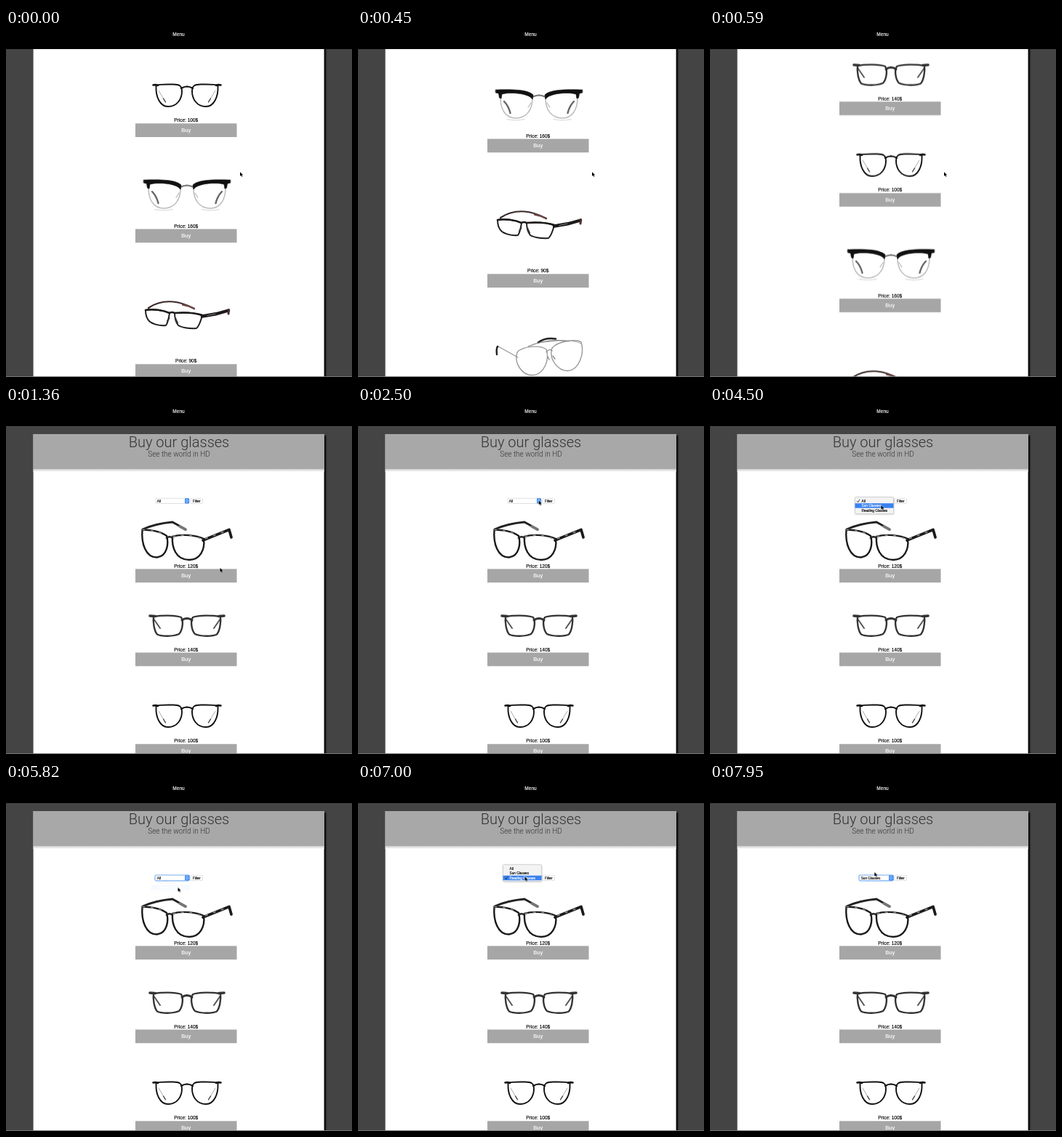
An HTML page that plays this animation: 476x480 px, repeating every 8000 ms.

```html
<!DOCTYPE html>
<html lang="en">
<head>
<meta charset="utf-8">
<title>Buy our glasses</title>
<style>
  html, body { margin: 0; width: 100%; height: 100%; overflow: hidden; background: #444; }
  svg { display: block; width: 476px; height: 480px; font-family: "Liberation Sans", Arial, sans-serif; }
  path { fill: none; stroke-linecap: round; stroke-linejoin: round; }
  .mid { text-anchor: middle; }
  .light { font-family: Roboto, "Open Sans", sans-serif; font-weight: 300; fill: #333; }
  .small { font-size: 4.7px; }
  .dark { fill: #000; stroke: #000; stroke-width: .15px; }
  .white { fill: #fff; stroke: #fff; stroke-width: .15px; }

  #page, #cursor, #popup, .hi, .step { animation: 8s infinite; }
  #page { animation-name: scroll; }
  #cursor { animation-name: point; animation-timing-function: ease-in-out; }
  #popup { animation-name: popup; animation-timing-function: linear; }
  .hi, .step { animation-timing-function: step-end; opacity: 0; }
  #hi0 { animation-name: hi0; }
  #hi1 { animation-name: hi1; }
  #hi2 { animation-name: hi2; }
  #ring { animation-name: ring; }
  #pick0 { animation-name: pick0; }
  #pick1 { animation-name: pick1; }
  #pick2 { animation-name: pick2; }

  @keyframes scroll {
    0%, .6% { transform: translateY(-335px); animation-timing-function: ease-in-out; }
    5.2%, 5.8% { transform: translateY(-459px); animation-timing-function: cubic-bezier(.4, 0, .3, 1); }
    10%, 100% { transform: translateY(0); }
  }
  @keyframes point {
    0%, 11% { transform: translate(322px, 198px); }
    16.5%, 18% { transform: translate(294.5px, 224px); }
    25%, 34% { transform: translate(248.7px, 131.5px); }
    40% { transform: translate(241px, 134px); }
    50%, 57% { transform: translate(235.5px, 138px); }
    66%, 74% { transform: translate(236.5px, 145px); }
    80%, 86% { transform: translate(230px, 131px); }
    92%, 100% { transform: translate(226.3px, 124px); }
  }
  @keyframes popup {
    0%, 33% { opacity: 0; }
    33.01%, 72% { opacity: 1; }
    72.8%, 86% { opacity: 0; transform: none; }
    86.01%, 96% { opacity: 1; transform: translateY(-13px); }
    96.8%, 100% { opacity: 0; transform: translateY(-13px); }
  }
  @keyframes hi0 { 0%, 43% { opacity: 0; } 33% { opacity: 1; } }
  @keyframes hi1 { 0%, 61%, 97% { opacity: 0; } 43%, 88% { opacity: 1; } }
  @keyframes hi2 { 0%, 73%, 88% { opacity: 0; } 61%, 86% { opacity: 1; } }
  @keyframes ring { 0% { opacity: 0; } 33%, 100% { opacity: 1; } }
  @keyframes pick0 { 0% { opacity: 1; } 73.2%, 100% { opacity: 0; } }
  @keyframes pick1 { 0% { opacity: 0; } 97.2%, 100% { opacity: 1; } }
  @keyframes pick2 { 0%, 97.2%, 100% { opacity: 0; } 73.2% { opacity: 1; } }
</style>
</head>
<body>
<svg viewBox="0 0 476 480">
  <defs>
    <linearGradient id="fade" x2="0" y2="1">
      <stop stop-color="#ccc"/><stop offset="1" stop-color="#fff"/>
    </linearGradient>
    <filter id="soft" x="-5%" y="-5%" width="110%" height="110%"><feGaussianBlur stdDeviation=".8"/></filter>

    <g id="halfRound">
      <path d="M210 86L219 101" stroke="#aaa" stroke-width="1"/>
      <path d="M216.500 97L219.500 102" stroke="#444" stroke-width="1.4"/>
      <path d="M206.500 81C206 93 211 108 223 108C236 108 242 97 242 87C242 79 238 77.500 230 77.500C221 77.500 211 77 206.500 79Z" stroke="#111" stroke-width="1.9"/>
      <path d="M202.500 78.500Q206 77.500 209 79" stroke="#111" stroke-width="2.6"/>
      <path d="M241 83Q245 80.500 249 80.500" stroke="#111" stroke-width="2.2"/>
    </g>
    <g id="halfBrow">
      <path d="M201 225Q207 231 209.500 241" stroke="#666" stroke-width="2.4"/>
      <path d="M205 249.500Q217 252 229 249.500" stroke="#e2e2e2" stroke-width="1.6"/>
      <path d="M196 220C196 236 203 248 217 248C232 248 240 236 240 221" stroke="#bbb" stroke-width="1.5"/>
      <path d="M241 218.500Q245 216.500 249 216.500" stroke="#777" stroke-width="2"/>
      <path d="M238 227L234 233" stroke="#bbb" stroke-width="1.3"/>
      <path d="M189.500 209C203 209 232 207 241 216L240 222C235 213 206 212 198 215L197 221L194.500 220L193.500 214L189.500 213Z" style="fill:#111" stroke="#111" stroke-width=".7"/>
    </g>
    <g id="halfBox">
      <path d="M203 294L212 307" stroke="#555" stroke-width="2"/>
      <path d="M203 291C215 289 233 289 241 292C245 299 242 311 238 315C230 318.500 214 318.500 208 315.500C204 311 202 299 203 291Z" stroke="#333" stroke-width="2.4"/>
      <path d="M198 290L205 290.500" stroke="#333" stroke-width="3.6"/>
      <path d="M242 296Q245 293.500 249 293.500" stroke="#333" stroke-width="3"/>
    </g>

    <g id="tortoise">
      <path d="M188 171Q206 163 229 161L247 171" stroke="#222" stroke-width="3"/>
      <path d="M239 167L247 171.500" stroke="#777" stroke-width="3.500"/>
      <path d="M187.500 172C198 171 213 174 221 180C224 190 222 208 208 209.500C192 210 186 190 187.500 172Z" stroke="#1b1b1b" stroke-width="2.4"/>
      <path d="M229 181C241 177 262 179 272 184C274 199 267 213 252 213C233 213 228 195 229 181Z" stroke="#1b1b1b" stroke-width="2.4"/>
      <path d="M221 183Q225 179.500 229 183" stroke="#222" stroke-width="2.6"/>
      <path d="M271 186L307 171.500L310 182" stroke="#1b1b1b" stroke-width="3.700"/>
      <path d="M188 171.500Q206 172 220 179M230 181Q252 176 271 185L306 172" stroke="#888" stroke-width="1.7" stroke-dasharray="2.500 9"/>
    </g>
    <g id="reading">
      <path d="M196 385C206 378 218 375.500 230 376.500Q243 377.500 259 386" stroke="#3a2828" stroke-width="2.2"/>
      <path d="M243 380.500Q252 382 259 386" stroke="#6a4442" stroke-width="2.4"/>
      <path d="M192 388C202 386 216 388 225 392C224 399 223 405 220 409C211 410 201 407 197 403C193 399 192 394 192 388Z" stroke="#1d1a1a" stroke-width="1.9"/>
      <path d="M232 392C245 391 258 391 270 395C268 403 266 410 262 413C253 414 242 412 237 409C233 404 232 398 232 392Z" stroke="#1d1a1a" stroke-width="1.9"/>
      <path d="M192 388C202 386 216 388 225 392Q228 390 232 392C245 391 258 391 270 395" stroke="#1d1a1a" stroke-width="2.6"/>
      <path d="M222 403L224.500 399M233 399L236 406" stroke="#333" stroke-width="2"/>
      <path d="M270 396.500L290 393L306 388.500" stroke="#1d1a1a" stroke-width="4.4"/>
      <path d="M277 395.500L288 393" stroke="#999" stroke-width=".8"/>
      <path d="M306.500 387.500L306 393" stroke="#4a3030" stroke-width="3"/>
    </g>
    <g id="aviator">
      <path d="M220 453L193 438Q190 442 191 449" stroke="#999" stroke-width="1.3"/>
      <path d="M192 438Q190 441 191 449" stroke="#222" stroke-width="2.4"/>
      <path d="M307 434Q298 429 275 430L247 433" stroke="#aaa" stroke-width="1"/>
      <path d="M248 432.500Q257 425.500 272 427.500" stroke="#222" stroke-width="2.6"/>
      <path d="M219 446C227 437 251 436 259 442C264 456 256 476 241 477.500C226 478.500 214 461 219 446Z" stroke="#999" stroke-width="1.4"/>
      <path d="M267 440C275 431 299 427 307 432C312 448 304 470 289 471.500C275 472 262 455 267 440Z" stroke="#999" stroke-width="1.4"/>
      <path d="M234 438Q262 426 290 431M259 446Q263 440 267 444" stroke="#888" stroke-width="1.2"/>
      <path d="M261 452L263 456M268 451L271 455" stroke="#888" stroke-width="1.4"/>
    </g>
  </defs>

  <rect width="476" height="480" fill="#444"/>
  <g id="page">
    <rect x="40" y="42" width="400" height="1060" fill="#000" filter="url(#soft)"/>
    <rect x="37.600" y="40" width="400" height="1060" fill="#fff"/>
    <rect x="37.600" y="88" width="400" height="4" fill="url(#fade)"/>
    <rect x="37.600" y="40" width="400" height="48" fill="#a8a8a8"/>
    <text class="light mid" x="238" y="57.800" font-size="20">Buy our glasses</text>
    <text class="light mid" x="238" y="71" font-size="10">See the world in HD</text>

    <g class="small">
      <rect x="206" y="128.300" width="46" height="7.200" rx="1.200" fill="#fff" stroke="#ccc" stroke-width=".6"/>
      <rect class="step" id="ring" x="205" y="128" width="47.400" height="7.800" rx="1.500" fill="#fff" stroke="#78aef0" stroke-width="1.200"/>
      <rect x="246" y="128.200" width="6" height="7.300" rx="1.200" fill="#3f8df5"/>
      <path d="M247.800 131.200L249 129.900L250.200 131.200M247.800 132.600L249 133.900L250.200 132.600" stroke="#fff" stroke-width=".7"/>
      <g id="picks"></g>
      <rect x="254" y="128.300" width="16.500" height="7.200" rx="1.300" fill="#fff" stroke="#ccc" stroke-width=".6"/>
      <text class="mid dark" x="262.300" y="133.600">Filter</text>
    </g>
    <g id="shop"></g>
  </g>

  <g id="popup" class="small">
    <rect x="199.500" y="127" width="53.500" height="23.500" rx="1.500" fill="#888" opacity=".45" filter="url(#soft)"/>
    <rect x="199.500" y="126.700" width="53" height="23" rx="1.500" fill="#f3f3f3" stroke="#bbb" stroke-width=".5"/>
    <g id="rows"></g>
  </g>

  <rect width="476" height="29" fill="#000"/>
  <text class="mid white" x="237.500" y="11" font-size="6.5">Menu</text>
  <rect y="479" width="476" height="1" fill="#777"/>

  <path id="cursor" d="M0 0V5.700L1.400 4.500L2.400 6.700L3.300 6.300L2.400 4.200H4.100Z" style="fill:#000" stroke="#fff" stroke-width=".5" paint-order="stroke"/>
</svg>
<script>
  const fill = (id, html) => { document.getElementById(id).innerHTML = html; };
  const mirrored = id => `<use href="#${id}"/><use href="#${id}" transform="translate(498) scale(-1 1)"/>`;
  const whole = id => `<use href="#${id}"/>`;

  // artwork, vertical shift, price, top of the button
  const products = [
    [whole("tortoise"), 0, 120, 225.5],
    [mirrored("halfBox"), 0, 140, 340.5],
    [mirrored("halfRound"), 335, 100, 466.3],
    [mirrored("halfBrow"), 335, 160, 611.5],
    [whole("reading"), 335, 90, 797.3],
    [whole("aviator"), 459, 110, 967],
  ];
  fill("shop", products.map(([art, shift, price, top]) => `
    <g transform="translate(0 ${shift})">${art}</g>
    <text class="mid dark" x="247.7" y="${top - 2}" font-size="6.5">Price: ${price}$</text>
    <rect x="178" y="${top}" width="139.500" height="18.700" fill="#a6a6a6"/>
    <text class="mid white" x="247.7" y="${top + 11.8}" font-size="7.5">Buy</text>`).join(""));

  const options = ["All", "Sun Glasses", "Reading Glasses"];
  fill("picks", options.map((name, i) =>
    `<text class="step dark" id="pick${i}" x="207.700" y="133.600">${name}</text>`).join(""));

  const tick = (i, y) =>
    `<path class="step" style="animation-name:pick${i}" d="M202.500 ${y - 1.4}l1.200 1.500l2.200 -3.700" stroke="#222" stroke-width=".8"/>`;
  fill("rows", options.map((name, i) => {
    const y = 133.6 + 6.5 * i;
    const label = tone => `<text class="${tone}" x="208.500" y="${y}">${name}</text>`;
    return label("dark") + `<g class="hi" id="hi${i}">
      <rect x="199.500" y="${y - 4.9}" width="53" height="6.500" fill="#3b82f0"/>${label("white")}</g>` +
      (i === 1 ? "" : tick(i, y));
  }).join(""));
</script>
</body>
</html>
```
